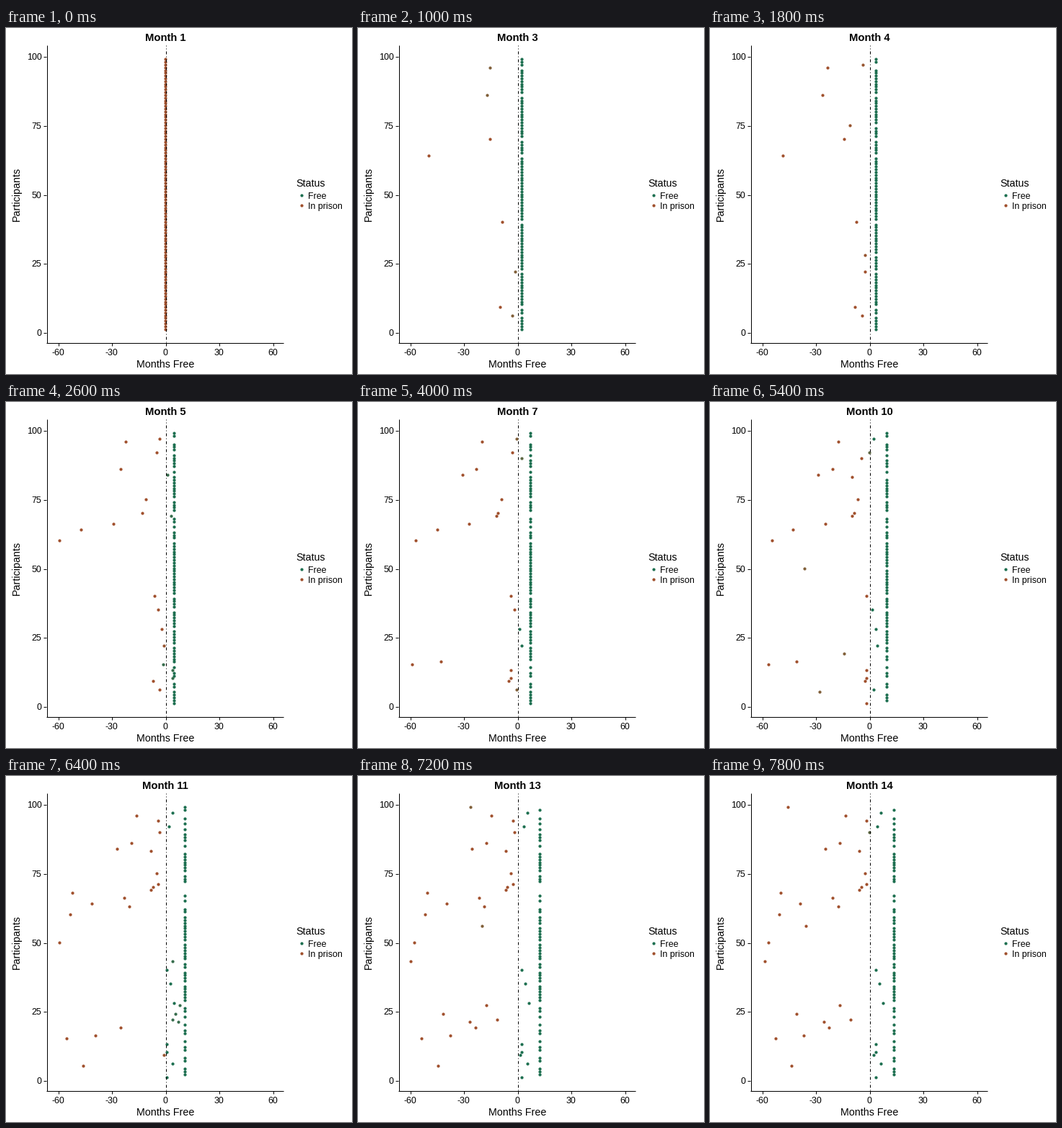
A matplotlib script that plays this animation: 480 by 480 pixels, repeating every 8000 ms.

```python
import math

import matplotlib.pyplot as plt
import numpy as np
from matplotlib.animation import FuncAnimation

SIZE, DPI = 480, 96
PT = 72 / DPI                      # points per pixel
FRAMES, INTERVAL = 40, 200
STEPS = 5                          # animation steps per month
RATE = 1.62                        # animation steps per frame
PEOPLE = range(1, 100)
FREE, PRISON = "#1d6f50", "#a0502d"

# month of imprisonment -> {participant: months to serve}
SENTENCES = {
    2: {70: 16, 64: 50, 40: 9, 9: 10},
    3: {96: 24, 86: 27, 22: 3, 6: 5},
    4: {97: 4, 75: 12, 28: 3},
    5: {92: 5, 66: 29, 60: 59, 35: 4},
    6: {84: 32, 69: 13, 15: 60, 13: 5, 10: 5},
    7: {16: 43},
    8: {90: 6},
    9: {83: 10, 1: 2},
    10: {50: 60, 19: 26, 5: 47},
    11: {94: 4, 71: 4, 68: 52, 63: 20},
    12: {43: 60, 27: 18, 24: 42, 22: 12, 21: 27},
    13: {99: 46, 56: 36},
}

RGB_TO_XYZ = np.array([[0.4124, 0.3576, 0.1805],
                       [0.2126, 0.7152, 0.0722],
                       [0.0193, 0.1192, 0.9505]])
WHITE = RGB_TO_XYZ.sum(axis=1)


def to_cone(color):
    """Cube-root XYZ, in which blending equals blending in Lab."""
    rgb = np.array([int(color[i:i + 2], 16) for i in (1, 3, 5)]) / 255
    linear = ((rgb + 0.055) / 1.055) ** 2.4
    return np.cbrt(RGB_TO_XYZ @ linear / WHITE)


def blend(amount):
    """Colours from free (0) to prison (1)."""
    a = np.asarray(amount)[:, None]
    cone = (1 - a) * to_cone(FREE) + a * to_cone(PRISON)
    linear = np.clip((cone ** 3 * WHITE) @ np.linalg.inv(RGB_TO_XYZ).T, 0, 1)
    return np.clip(1.055 * linear ** (1 / 2.4) - 0.055, 0, 1)


def months_free(person, month):
    if month == 1:
        return 0
    value = month
    for start, group in SENTENCES.items():
        if start <= month and person in group:
            value = month - start - group[person]
            if value >= 0:
                value += 1         # the count skips zero
    return value


def state(month):
    x = np.array([months_free(p, month) for p in PEOPLE], float)
    return x, (x <= 0).astype(float)


def px(value):
    return 220.7 + 2.485 * value


def py(value):
    return 421.6 - 3.822 * value


def snap(value):
    return np.floor(np.asarray(value) + 0.5) + 0.5


fig = plt.figure(figsize=(SIZE / DPI, SIZE / DPI), dpi=DPI, facecolor="white")
ax = fig.add_axes([0, 0, 1, 1])
ax.set_xlim(0, SIZE)
ax.set_ylim(SIZE, 0)
ax.axis("off")


def label(x, y, text, size, **kw):
    return ax.text(x, y, text, fontsize=size * PT, color="black",
                   family="Liberation Sans", **kw)


def line(xs, ys, **kw):
    ax.plot(xs, ys, color="black", lw=PT, solid_capstyle="butt",
            dash_capstyle="butt", **kw)


def dots(x, y, colors, **kw):
    return ax.scatter(x, y, s=(4.2 * PT) ** 2, c=colors, linewidths=0, **kw)


# axes
line([56.5, 56.5], [24, 437])
line([56, 385], [436.5, 436.5])
for v in range(0, 101, 25):
    y = float(snap(py(v)))
    line([52, 56], [y, y])
    label(49.5, y + 4.5, str(v), 12.4, ha="right")
for v in range(-60, 61, 30):
    x = float(snap(px(v)))
    line([x, x], [437, 441])
    label(x - 0.5, 454, str(v), 12.4, ha="center")
label(221, 471, "Months Free", 14.2, ha="center")
label(22, 230, "Participants", 14.2, ha="right", va="center", rotation=90)
title = label(221, 18, "", 14.8, ha="center", weight="bold")

# legend
label(402, 220, "Status", 14.2)
for y, name, color in ((231.5, "Free", FREE), (245.5, "In prison", PRISON)):
    dots([409.5], [y], [color])
    label(419, y + 5.5, name, 12.4)

rows = snap(py(np.array(PEOPLE)))
points = dots(np.full(len(rows), 221.5), rows, blend(np.ones(len(rows))), zorder=2)
line([221.5, 221.5], [436, 24], dashes=(1, 3, 4, 3), zorder=3)


def draw(frame):
    step = int(frame * RATE)
    month, part = 1 + step // STEPS, step % STEPS / STEPS
    ease = (1 - math.cos(math.pi * part)) / 2
    (x0, c0), (x1, c1) = state(month), state(month + 1)
    x = x0 + (x1 - x0) * ease
    points.set_offsets(np.column_stack([snap(px(x)), rows]))
    points.set_facecolors(blend(c0 + (c1 - c0) * ease))
    title.set_text(f"Month {month + (part > 0.5)}")
    return points, title


anim = FuncAnimation(fig, draw, frames=FRAMES, interval=INTERVAL,
                     repeat=True, repeat_delay=0)
plt.show()
```
